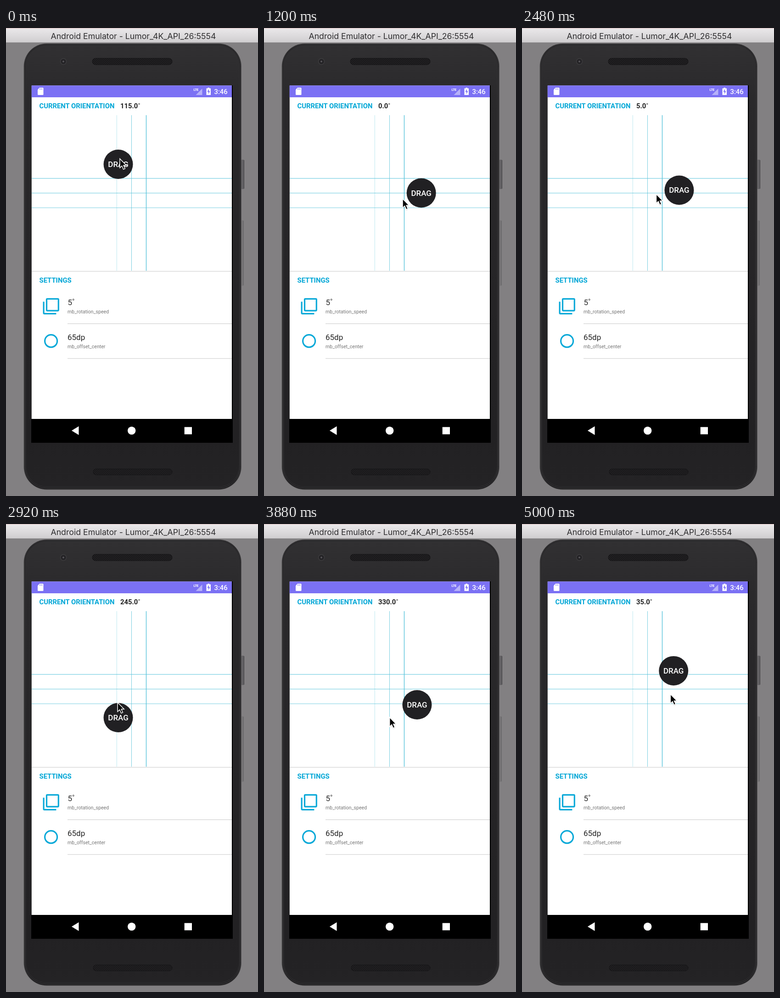
Animation of 549x1020 px, one loop 5040 ms. Source, as an HTML page:

```html
<!DOCTYPE html>
<html lang="en">
<head>
<meta charset="utf-8">
<title>Orientation drag</title>
<style>
html, body { margin: 0; width: 100%; height: 100%; overflow: hidden; background: #828082; }
svg { display: block; width: 549px; height: 1020px; font-family: Roboto, sans-serif; }
.head { font-size: 14.85px; font-weight: 700; fill: #00a6d6; }
.row { font-size: 17px; fill: #212121; }
.sub { font-size: 10.6px; fill: #757575; }
</style>
</head>
<body>
<svg viewBox="0 0 549 1020">
  <defs>
    <linearGradient id="bar" x2="0" y2="1">
      <stop stop-color="#ebe9eb"/><stop offset="1" stop-color="#d0ced0"/>
    </linearGradient>
    <linearGradient id="body" x2="0" y2="1">
      <stop stop-color="#313032"/><stop offset=".12" stop-color="#2a292b"/>
      <stop offset=".88" stop-color="#222123"/><stop offset="1" stop-color="#242325"/>
    </linearGradient>
    <pattern id="mesh" width="4" height="4" patternUnits="userSpaceOnUse">
      <rect width="4" height="4" fill="#151416"/>
      <circle cx="1" cy="1" r=".8" fill="#39383a"/><circle cx="3" cy="3" r=".8" fill="#39383a"/>
    </pattern>
    <filter id="soft" x="-50%" y="-50%" width="200%" height="200%"><feGaussianBlur stdDeviation="1.2"/></filter>
  </defs>

  <rect width="549" height="1020" fill="#828082"/>
  <rect width="549" height="31" fill="url(#bar)"/>
  <path d="M0 .5H549" stroke="#d9b9b9"/>
  <path d="M0 31.5H549" stroke="#a5a3a5"/>
  <text x="277.5" y="23.5" font-family="Inter, sans-serif" font-size="17.7" fill="#2e2d2f" text-anchor="middle">Android Emulator - Lumor_4K_API_26:5554</text>

  <!-- phone -->
  <rect x="513" y="287" width="5.500" height="64" rx="1" fill="#636164"/>
  <path d="M518.500 288V350" stroke="#3d3c3e"/>
  <rect x="513" y="419" width="4" height="143" rx="1" fill="#787678"/>
  <path d="M517 420V561" stroke="#555456" stroke-width=".8"/>
  <rect x="38.500" y="33.500" width="474.500" height="973" rx="50" fill="#3a393b" opacity=".5"/>
  <rect x="39.500" y="34.500" width="472.500" height="971" rx="49" fill="#1e1d1f"/>
  <rect x="41" y="36" width="469.500" height="967" rx="47.500" fill="none" stroke="#414042"/>
  <rect x="43" y="38" width="465.500" height="962" rx="45" fill="url(#body)" stroke="#333234"/>
  <circle cx="125" cy="73" r="7.5" fill="#3a393b"/>
  <circle cx="125" cy="73" r="5.5" fill="#232225"/>
  <circle cx="125" cy="73" r="2" fill="#555358"/>
  <rect x="188" y="66" width="174" height="14" rx="7" fill="url(#mesh)" stroke="#151416"/>
  <rect x="190" y="961" width="172" height="13" rx="6.5" fill="url(#mesh)" stroke="#151416"/>

  <!-- screen -->
  <rect x="55" y="125" width="439" height="779"/>
  <rect x="55.700" y="125.300" width="436.300" height="726.700" fill="#fff"/>
  <rect x="55.700" y="125.300" width="436.300" height="25.700" fill="#7b71f4"/>
  <g fill="#fff">
    <path d="M73 130h7q1.500 0 1.500 1.500v13q0 1.500-1.500 1.500h-9.500q-1.500 0-1.500-1.500v-10z"/>
    <path d="M427.500 132v14h-14z" opacity=".45"/>
    <text x="408.500" y="137" font-size="7.400" font-weight="700" letter-spacing="-.6">LTE</text>
    <path d="M439.500 130h3.500v1.500h3v14.500h-9.500v-14.500h3z"/>
    <text x="453.500" y="144" font-size="14.850" font-weight="500">3:46</text>
    <path d="M158.500 868v19l-15.500-9.500z"/>
    <circle cx="273.700" cy="877.500" r="8.700"/>
    <rect x="388.700" y="869.700" width="16.300" height="15.800"/>
  </g>
  <path d="M73.500 131.500v3M76 131.500v3M78.500 131.500v3" stroke="#7b71f4"/>
  <path d="M442 133l-3.500 6h2.500v5l3.500-6.500h-2.500z" fill="#7b71f4"/>

  <text class="head" x="72.500" y="175.300">CURRENT ORIENTATION</text>
  <text id="value" class="head" x="249" y="175.300" style="fill:#212121"></text>
  <g stroke="#59c3da">
    <path d="M241.300 190V529" opacity=".4"/>
    <path d="M273.500 190V529" opacity=".8"/>
    <path d="M305.500 190V529" stroke-width="1.400"/>
    <path d="M56 327.800H492"/>
    <path d="M56 359.800H492" opacity=".9"/>
    <path d="M56 391.800H492" opacity=".8"/>
  </g>
  <path d="M56 530.200H492M134 644.500H492M134 720.300H492" stroke="#c9c9c9" stroke-width="1.100"/>
  <text class="head" x="72.500" y="555.300">SETTINGS</text>
  <g fill="none" stroke="#0aa9d8" stroke-width="3.200">
    <rect x="88.500" y="590.300" width="25.800" height="25.800" rx="1.500"/>
    <path d="M82.100 596.500v24.500q0 1.600 1.600 1.600h25.700"/>
    <circle cx="98.100" cy="682.200" r="13.500"/>
  </g>
  <text class="row" x="134.500" y="604">5˚</text>
  <text class="sub" x="134" y="622">mb_rotation_speed</text>
  <text class="row" x="134" y="680">65dp</text>
  <text class="sub" x="134" y="698">mb_offset_center</text>

  <g id="ball">
    <circle r="32" fill="#212023"/>
    <text y="6" font-size="17" font-weight="500" fill="#fff" text-anchor="middle">DRAG</text>
  </g>
  <g id="cursor">
    <path d="M0 1v20l4.500-4.300 3.300 7.600 3.500-1.500-3.200-7.300h6z" opacity=".35" filter="url(#soft)"/>
    <path d="M0 0v20l4.500-4.300 3.300 7.600 3.500-1.500-3.200-7.300h6z" stroke="#fff" stroke-width="1.500"/>
  </g>
</svg>
<script>
const LOOP = 5040, STEP = 40, CX = 273.7, CY = 359.5, ORBIT = 69;

// time, ball angle, pointer angle, pointer radius (clockwise drag, angles fall)
const keys = [
  [0, 115, 109, 79],
  [360, 115, 109, 79],
  [1200, 0, -24, 31],
  [1760, -155, -190, 53],
  [2480, -355, -368, 19],
  [3360, -600, -624, 66],
  [3880, -750, -810, 62],
  [5000, -1045, -1093, 51]
];

const $ = id => document.getElementById(id);

function pose(t) {
  let i = 0;
  while (i < keys.length - 2 && t >= keys[i + 1][0]) i++;
  const a = keys[i], b = keys[i + 1];
  let k = Math.min(1, (t - a[0]) / (b[0] - a[0]));
  if (i === 1) k *= k; // the drag starts from rest
  return a.map((v, n) => v + (b[n] - v) * k);
}

function place(id, angle, radius) {
  const r = angle * Math.PI / 180;
  $(id).setAttribute("transform",
    `translate(${CX + radius * Math.cos(r)} ${CY - radius * Math.sin(r)})`);
}

function draw(now) {
  const t = Math.floor(now % LOOP / STEP) * STEP;
  const [, ball, pointer, radius] = pose(t);
  const angle = Math.round(ball / 5) * 5;
  $("value").textContent = ((angle % 360 + 360) % 360).toFixed(1) + "˚";
  place("ball", angle, ORBIT);
  place("cursor", pointer, radius);
  requestAnimationFrame(draw);
}
draw(0);
</script>
</body>
</html>
```
